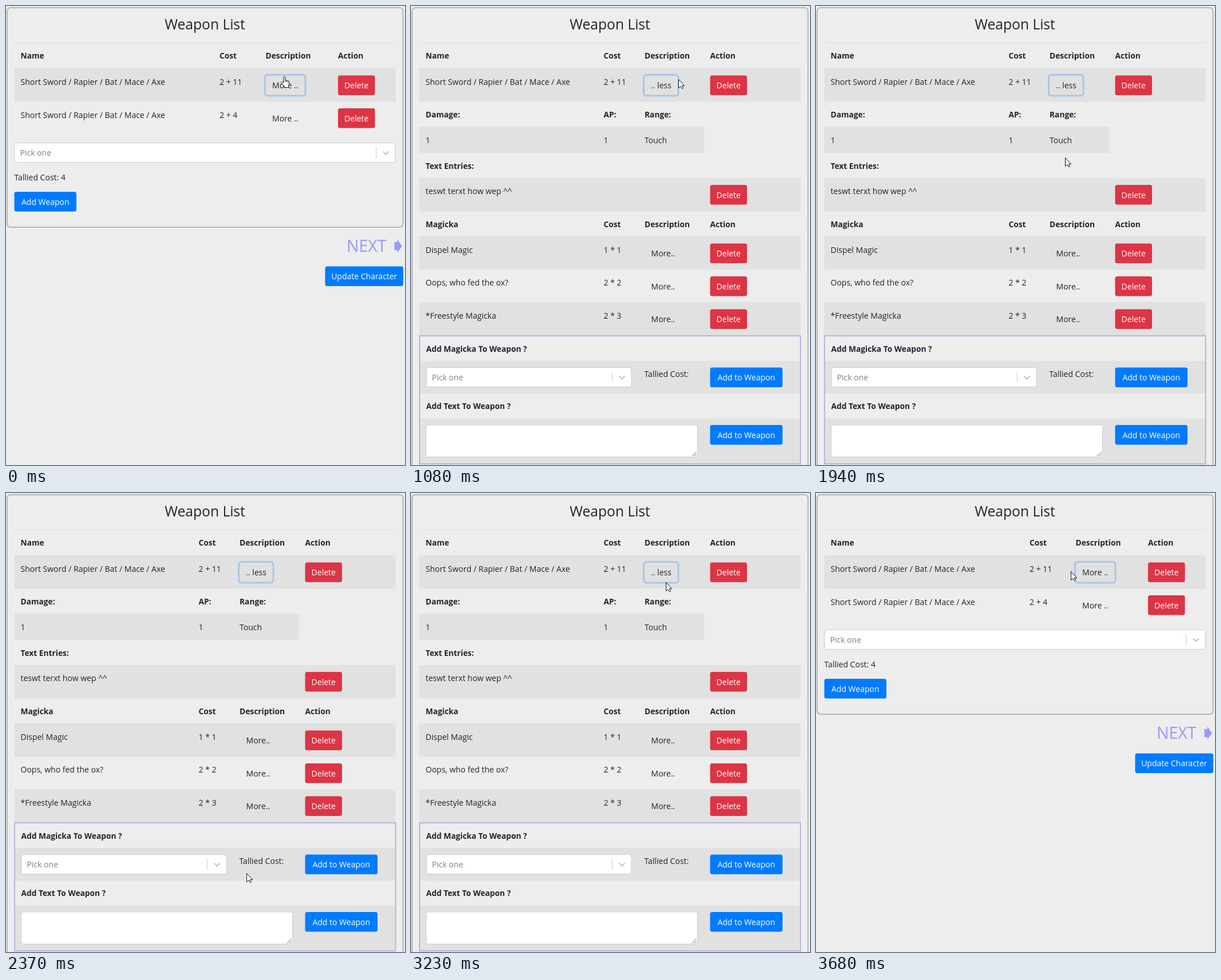
Write an HTML page that moves like this. It is 697 by 803 pixels and loops after 4.21 s.

```html
<!DOCTYPE html>
<html lang="en">
<head>
<meta charset="utf-8">
<title>Weapon List</title>
<style>
  html, body { margin: 0; width: 100%; height: 100%; overflow: hidden; background: #ededed; }
  svg { display: block; }
  text { font: 14px "Open Sans", "Noto Sans", sans-serif; fill: #212529; white-space: pre; }
  .bold { font-weight: 700; font-size: 13.75px; }
  .title { font-weight: 500; font-size: 24.6px; text-anchor: middle; }
  .label { fill: #fff; text-anchor: middle; }
  .hint { fill: #808080; }
  .next { font-size: 28.5px; fill: #9a98fb; }
  .field { fill: #fff; stroke: #ccc; }
  .ring { fill: none; stroke: #a9c6ea; stroke-width: 3; }
  .cursor { fill: #fff; stroke: #111; stroke-linejoin: round; }
</style>
</head>
<body>
<svg id="stage" width="697" height="803" viewBox="0 0 697 803"></svg>
<script>
const RED = '#dc3545', BLUE = '#007bff';

const text = (x, y, str, cls = '') => `<text x="${x}" y="${y}" class="${cls}">${str}</text>`;
const rect = (x, y, w, h, attrs) => `<rect x="${x}" y="${y}" width="${w}" height="${h}" ${attrs}/>`;
const stripe = (y, h, x = 14.5, w = 666) => rect(x, y, w, h, 'fill="#e1e1e1"');
const button = (x, y, w, str, color) =>
  rect(x, y, w, 34.5, `rx="3.5" fill="${color}"`) + text(x + w / 2, y + 22.5, str, 'label');
const remove = (x, y) => button(x, y, 64.5, 'Delete', RED);
const ring = (x, w) => rect(x, 120.5, w, 36.5, 'rx="4.5" class="ring"');
const card = height => rect(2, 3, 691.5, height, 'rx="6" fill="none" stroke="#b6b6b6" stroke-width="2"');
const columns = (y, xs, names) => names.map((name, i) => text(xs[i], y, name, 'bold')).join('');

function select(x, y, w) {
  const right = x + w;
  return rect(x + .5, y + .5, w - 1, 34, 'rx="3.5" class="field"') +
    text(x + 10, y + 23, 'Pick one', 'hint') +
    `<path d="M${right - 34} ${y + 8}v19M${right - 22} ${y + 15.5}l5 5 5-5" fill="none" stroke="#ccc"/>` +
    `<path d="M${right - 22} ${y + 15.5}l5 5 5-5" fill="none" stroke="#c4c4c4" stroke-width="2"/>`;
}

const heading = text(347.5, 41, 'Weapon List', 'title') + rect(14.5, 64, 666, 1, 'fill="#dedede"');
const weapon = 'Short Sword / Rapier / Bat / Mace / Axe';
const headers = ['Name', 'Cost', 'Description', 'Action'];

const collapsedView = card(384) + heading +
  columns(92, [25.5, 373, 453.5, 580], headers) +
  stripe(109, 58.5) +
  [[0, '2 + 11'], [57.5, '2 + 4']].map(([dy, cost]) =>
    text(25.5, 138 + dy, weapon) + text(373, 138 + dy, cost) +
    text(465, 144 + dy, 'More ..') + remove(580, 121.5 + dy)).join('') +
  ring(452.5, 70.5) +
  select(14.5, 239, 666) +
  text(14.5, 305, 'Tallied Cost: 4') +
  button(14.5, 325, 108.5, 'Add Weapon', BLUE) +
  text(595, 430, 'NEXT', 'next') +
  '<path d="M678.5 413h5v-4.5l8.5 11.5-8.5 11.5v-4.5h-5z" fill="#9a98fb"/>' +
  button(557.5, 455.5, 136.5, 'Update Character', BLUE);

const cols = [25.5, 336.5, 408, 522.5];
const magicka = [['Dispel Magic', '1 * 1'], ['Oops, who fed the ox?', '2 * 2'], ['*Freestyle Magicka', '2 * 3']];

const expandedView = card(900) + heading +
  [[109, 58.5], [301, 58.5], [403, 58.5], [518, 58.5], [621, 57], [721.5, 79]]
    .map(([y, h]) => stripe(y, h)).join('') +
  stripe(211, 46, 14.5, 497.5) +
  columns(92, cols, headers) +
  text(25.5, 138, weapon) + text(336.5, 138, '2 + 11') + text(419, 144, '.. less') +
  ring(406.5, 60.5) + remove(522.5, 121.5) +
  columns(195, cols, ['Damage:', 'AP:', 'Range:']) +
  ['1', '1', 'Touch'].map((value, i) => text(cols[i], 240, value)).join('') +
  text(25.5, 285, 'Text Entries:', 'bold') +
  text(25.5, 329, 'teswt terxt how wep ^^') + remove(522.5, 313) +
  columns(387, cols, ['Magicka', 'Cost', 'Description', 'Action']) +
  magicka.map(([name, cost], i) => {
    const y = 431.5 + 57.5 * i;
    return text(25.5, y, name) + text(336.5, y, cost) + text(419.5, y + 6.5, 'More..') + remove(522.5, y - 16);
  }).join('') +
  rect(15, 577, 665.5, 224, 'fill="none" stroke="#b8b5da" stroke-width="2"') +
  text(26.5, 605, 'Add Magicka To Weapon ?', 'bold') +
  select(26.5, 632, 359) +
  text(407.5, 649, 'Tallied Cost:') + button(522.5, 632.5, 126.5, 'Add to Weapon', BLUE) +
  text(26.5, 705, 'Add Text To Weapon ?', 'bold') +
  rect(26.5, 733, 474, 56, 'rx="3.5" class="field"') +
  '<path d="M491 787.5l7.5-7.5M495.5 787.5l3-3" stroke="#555"/>' +
  button(522.5, 733, 126.5, 'Add to Weapon', BLUE);

const cursors = {
  arrow: 'M.5.5V15.5L4 12.3 6.3 16.6 8.6 15.6 6.4 11.4H10.6Z',
  hand: 'M5 11.5V2a1.5 1.5 0 0 1 3 0V7a1.4 1.4 0 0 1 2.4.6 1.4 1.4 0 0 1 2.2.8 1.2 1.2 0 0 1 1.9 1V13q0 2-1 3.5v3H6V17.5L1 11.5q-.8-1.2.3-1.8 1-.4 2 .5ZM8 7v3M10.4 7.8V10M12.6 8.6V10.5',
  beam: 'M.5.5h2l1 1 1-1h2M3.5 1.5v14M.5 16.5h2l1-1 1 1h2'
};

// start time, cursor shape, left, top
const track = [
  [0, 'hand', 480, 123], [200, 'beam', 494, 83], [430, 'hand', 496, 152], [630, 'hand', 463, 128],
  [1080, 'arrow', 467, 128], [1490, 'arrow', 466, 128], [1720, 'hand', 460, 129],
  [1940, 'arrow', 435, 265], [2170, 'arrow', 406, 497], [2370, 'arrow', 420, 665],
  [2600, 'arrow', 440, 598], [2800, 'hand', 443, 431], [3030, 'arrow', 444, 250],
  [3230, 'arrow', 445, 156], [3460, 'hand', 441, 137], [3680, 'arrow', 445, 137]
];
const LOOP = 4210, OPEN = 1080, CLOSE = 3680;

const stage = document.getElementById('stage');
stage.innerHTML = `<g id="collapsed">${collapsedView}</g><g id="expanded">${expandedView}</g><path id="cursor" class="cursor"/>`;
const [collapsed, expanded, cursor] = stage.children;

function draw(now) {
  const time = Math.max(0, now - start) % LOOP;
  const open = time >= OPEN && time < CLOSE;
  collapsed.setAttribute('display', open ? 'none' : 'inline');
  expanded.setAttribute('display', open ? 'inline' : 'none');
  const [, shape, x, y] = track.findLast(([from]) => from <= time);
  cursor.setAttribute('d', cursors[shape]);
  cursor.setAttribute('transform', `translate(${x} ${y})`);
  requestAnimationFrame(draw);
}

const start = performance.now();
draw(start);
</script>
</body>
</html>
```
